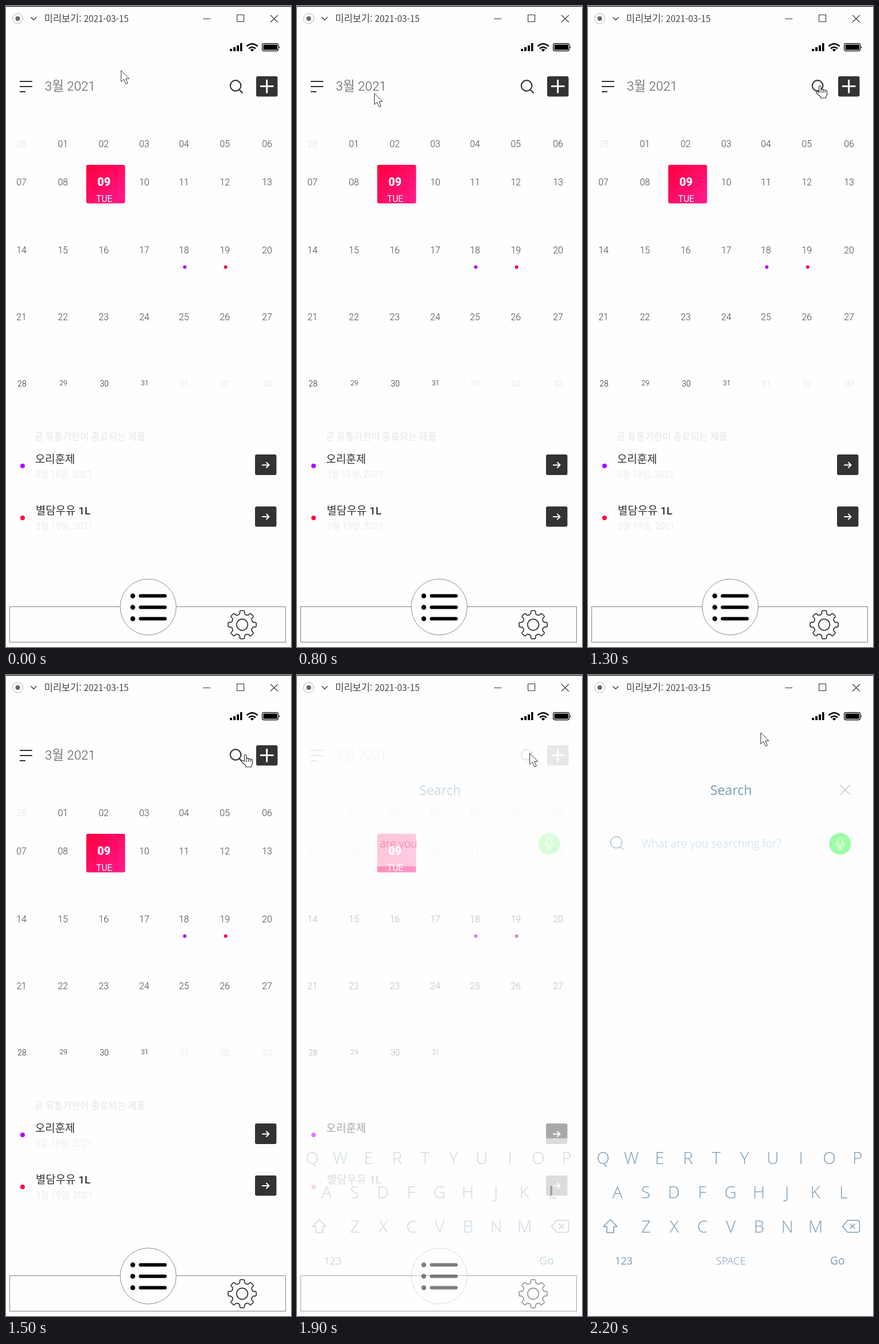
An HTML page that plays this animation: 499x1122 px, repeating every 2.3 s.

```html
<!DOCTYPE html>
<html lang="ko">
<head>
<meta charset="utf-8">
<title>Calendar preview</title>
<style>
  html, body { margin: 0; width: 100%; height: 100%; overflow: hidden; background: #fefefe; }
  svg { display: block; width: 100%; height: 100%; }
  text { font-family: Roboto, "Noto Sans CJK KR", "Noto Sans CJK", sans-serif; fill: #444; }
  .ko { font-family: "Noto Sans CJK KR", "Noto Sans CJK", sans-serif; }
  .mid { text-anchor: middle; }
  .line { fill: none; stroke: #333; }
  .thin { font-weight: 300; }
  .pale { font-weight: 300; fill: #e4e4e4; }
  .pale tspan { fill: #ececec; }
  .item { font-size: 19px; font-weight: 500; fill: #333; }
  .white { fill: none; stroke: #fff; stroke-width: 2; }
  .ui text { font-family: "Open Sans", "Noto Sans", sans-serif; fill: #7d9cb5; }
  .ui .line { stroke: #7d9cb5; }
</style>
</head>
<body>
<svg viewBox="0 0 499 1122" preserveAspectRatio="none">
  <defs>
    <linearGradient id="pink" gradientUnits="userSpaceOnUse" x1="141" y1="278" x2="208" y2="345">
      <stop offset=".1" stop-color="#ff0045"/><stop offset="1" stop-color="#ff1c8c"/>
    </linearGradient>
    <clipPath id="day"><rect x="140" y="278" width="69" height="67"/></clipPath>
  </defs>

  <!-- window bar and status icons -->
  <path d="M0 .5H499" stroke="#222" stroke-width="1.4"/>
  <circle cx="20.5" cy="22" r="9" fill="none" stroke="#b5b5b5"/>
  <circle cx="20.5" cy="22" r="4" fill="#666"/>
  <path class="line" d="M43.500 19.500l5 5 5-5" stroke-width="1.3"/>
  <text class="ko" x="67" y="27.500" font-size="15.300"><tspan font-size="16.500">미리보기</tspan>: 2021-03-15</text>
  <path class="line" d="M345 22.500H358M404.500 15.500h12v12h-12zM463 16l13 12.500M476 16l-13 12.500" stroke-width="1.1"/>
  <path d="M392 75h4v4h-4zM398 72h4v7h-4zM404 69h4v10h-4zM410 65h3.500v14H410z" fill="#000"/>
  <path d="M421.500 70.500q9.500-8.500 19 0M425 74.500q6-5 12 0" fill="none" stroke="#000" stroke-width="2.6"/>
  <path d="M427.500 76.500q3.500-2.500 7 0l-3.500 3.200z" fill="#000"/>
  <rect x="448.600" y="65.600" width="28" height="13" rx="3" fill="none" stroke="#000" stroke-width="1.2"/>
  <rect x="450.500" y="67.500" width="24.500" height="9.300" rx="1.500" fill="#000"/>
  <path d="M478 70q2.500 2 0 4.500z" fill="#000"/>

  <!-- search page -->
  <g class="ui" data-fade="search">
    <text x="214" y="209.500" font-size="23.200">Search</text>
    <circle cx="441.500" cy="295.500" r="19" fill="#9cfda4"/>
    <path class="white" d="M441.500 285a3.500 3.500 0 0 1 3.500 3.500v6a3.500 3.500 0 0 1-7 0v-6a3.500 3.500 0 0 1 3.500-3.500zM434.500 292.500v2a7 7 0 0 0 14 0v-2M441.500 301.500v4M437 305.500h9" style="stroke-width:1.400"/>
    <g id="keys"></g>
    <path class="line" d="M39 953l12 12.500h-6v10.500H33v-10.500h-6z" stroke-width="1.600" stroke-linejoin="round"/>
    <path class="line" d="M445.500 965l9-10.500H472q3.500 0 3.500 3.500v14q0 3.500-3.500 3.500h-17.500zM458.500 960.500l9 9M467.500 960.500l-9 9" stroke-width="1.500"/>
    <text x="47" y="1032" font-size="18.200">123</text>
    <text x="424" y="1032" font-size="19.200">Go</text>
  </g>
  <g class="ui" data-fade="field">
    <path class="line" d="M441.500 192.500l17.500 17M459 192.500l-17.500 17" stroke-width=".9"/>
    <circle class="line" cx="49.500" cy="293" r="10"/>
    <path class="line" d="M56.500 300.500l5.500 5.500"/>
    <text class="thin" x="94" y="301.500" font-size="19.600" style="fill:#bfdaec">What are you searching for?</text>
    <text class="mid thin" x="250" y="1032" font-size="18.400">SPACE</text>
  </g>

  <!-- calendar page -->
  <g data-fade="top">
    <path class="line" d="M24 132H46M24 141H46M24 150H34" stroke-width="2.200"/>
    <circle class="line" cx="402" cy="139.500" r="9.300" stroke-width="2.200"/>
    <path class="line" d="M408.500 146.500l6 6" stroke-width="2.300"/>
  </g>
  <g data-fade="head"><text class="thin" x="68" y="148" font-size="22.500" style="fill:#555">3<tspan fill="#777">월</tspan> 2021</text></g>
  <g data-fade="top">
    <rect x="438" y="123" width="37.500" height="35.500" rx="3" fill="#333"/>
    <path class="white" d="M445 140.500h23.500M456.700 129v23.500" style="stroke-width:3"/>
  </g>
  <g data-fade="box"><path d="M140.500 335v-54q0-3 3-3h62q3 0 3 3v54z" fill="url(#pink)"/></g>
  <g data-fade="boxEdge"><path d="M140.500 335h68v7.500q0 3-3 3h-62q-3 0-3-3z" fill="url(#pink)"/></g>
  <g data-fade="ghost" clip-path="url(#day)">
    <text x="94" y="301.500" font-size="19.600" style="font-family:'Open Sans',sans-serif;font-weight:300;fill:#d82068">What are you searching for?</text>
  </g>
  <g data-fade="label">
    <text class="mid" x="171.500" y="315" font-size="20" font-weight="800" style="fill:#fff">09</text>
    <text class="mid" x="172" y="343" font-size="15.600" style="fill:#fff">TUE</text>
  </g>
  <g id="days"></g>
  <g data-fade="dots">
    <circle cx="313" cy="457" r="3" fill="#b400ff"/><circle cx="384.500" cy="457" r="3" fill="#ff0040"/>
    <circle cx="29" cy="805" r="4" fill="#b400ff"/>
  </g>
  <g data-fade="faint">
    <text class="pale" x="50" y="759.500" font-size="16.500">곧 유통기한이 종료되는 제품</text>
    <text class="pale" x="51" y="824.500" font-size="15.600">3<tspan>월</tspan> 18<tspan>일</tspan>, 2021</text>
    <text class="pale" x="52" y="915.500" font-size="15.600">3<tspan>월</tspan> 19<tspan>일</tspan>, 2021</text>
  </g>
  <g data-fade="item1">
    <text class="item" x="51" y="800">오리훈제</text>
    <path d="M436 811v-23q0-3 3-3h31.500q3 0 3 3v23z" fill="#333"/>
  </g>
  <g data-fade="item2">
    <path d="M436 811h37.500v7q0 3-3 3H439q-3 0-3-3z" fill="#333"/>
    <text class="item" x="52" y="890">별담우유 1L</text>
    <circle cx="29" cy="896" r="4" fill="#ff0040"/>
    <rect x="436" y="876" width="37.500" height="35.500" rx="3" fill="#333"/>
  </g>
  <g data-fade="label">
    <path class="white" d="M448 803.500h12.500M455.500 798.500l5 5-5 5M448 894h12.500M455.500 889l5 5-5 5"/>
  </g>
  <g data-fade="ghost"><path d="M445.500 894v17" stroke="#5c6b78" stroke-width="3"/></g>

  <!-- bottom bar -->
  <g data-fade="bar"><rect x="6.500" y="1051.500" width="483" height="62" fill="none" stroke="#808080"/></g>
  <g data-fade="disc"><circle cx="249" cy="1052" r="49" fill="#fefefe" stroke="#808080" stroke-width=".9"/></g>
  <g data-fade="nav">
    <path d="M235.500 1032.500h43M235.500 1052.500h43M235.500 1072.500h43" stroke="#000" stroke-width="6" stroke-linecap="round"/>
    <path d="M222 1032.500h0M222 1052.500h0M222 1072.500h0" stroke="#000" stroke-width="8.500" stroke-linecap="round"/>
    <path id="gear" class="line" stroke-width="1.700" stroke-linejoin="round"/>
    <circle class="line" cx="413.500" cy="1083" r="9.800" stroke-width="1.700"/>
  </g>

  <g id="arrow"><path d="M.5 1v19.500l4.700-4.200 3.700 8.400 3.200-1.400-3.500-8.100h6z" fill="#fff" stroke="#333" stroke-linejoin="round"/></g>
  <g id="hand"><path d="M6.500 13.500V3.500q0-2 1.700-2t1.800 2v5.700q.4-1.700 2-1.500 1.600.2 1.700 1.800.4-1.300 1.900-1 1.500.3 1.600 1.800.5-1 1.800-.7 1.500.4 1.500 2.200v4.700q0 2.500-2 4.300v2.200H9v-2.200L2 14.500q-1.400-2 .2-2.800 1.400-.6 2.600.6zM10 9v5M13.700 10v4M17.200 11v3" fill="#fff" stroke="#333" stroke-width="1.200" stroke-linejoin="round"/></g>
</svg>
<script>
const $ = id => document.getElementById(id);
const STEP = 100, LOOP = 2300, FADE = 18;

const label = (str, x, y, size, extra = '') =>
  `<text class="mid thin" x="${x}" y="${y}" font-size="${size}" ${extra}>${str}</text>`;
const pad = n => String(n).padStart(2, '0');

// calendar days
const cols = [27, 99.5, 171, 242, 311.5, 383, 457];
const rows = [246.7, 313.5, 432.5, 550.2, 666];
$('days').innerHTML = rows.map((y, r) => {
  const cells = cols.map((x, c) => {
    const n = r * 7 + c;
    if (n === 9) return '';
    const out = n === 0 || n > 31;
    const small = n === 29 || n === 31;
    const size = r < 4 ? 16 : small ? 12 : 14;
    const day = n === 0 ? 28 : n > 31 ? n - 31 : n;
    const fill = out ? 'style="fill:#e0e0e0" data-fade="faint"' : r === 4 ? 'style="fill:#222"' : '';
    return label(pad(day), r < 4 ? x : x + 1, small ? y - 2 : y, size, fill);
  });
  return `<g data-fade="${r < 2 ? 'early' : 'late'}">${cells.join('')}</g>`;
}).join('');

// keyboard letters
$('keys').innerHTML = [['QWERTYUIOP', 26.5], ['ASDFGHJKL', 51.5], ['ZXCVBNM', 101.5]]
  .map(([keys, x0], r) => [...keys].map((k, i) => label(k, x0 + i * 49.5, 856 + r * 60, 29.5)).join(''))
  .join('');

// gear with eight teeth
const polar = (deg, r) => {
  const a = deg * Math.PI / 180;
  return `${(413.5 + r * Math.sin(a)).toFixed(1)} ${(1083 - r * Math.cos(a)).toFixed(1)}`;
};
let gear = '';
for (let a = 0; a < 360; a += 45) {
  gear += `${a ? 'L' : 'M'}${polar(a - 12, 20)}L${polar(a - 10, 23.5)}Q${polar(a - 9, 24.7)} ${polar(a - 6, 24.7)}` +
    `L${polar(a + 6, 24.7)}Q${polar(a + 9, 24.7)} ${polar(a + 10, 23.5)}L${polar(a + 12, 20)}Q${polar(a + 22.5, 17)} ${polar(a + 33, 20)}`;
}
$('gear').setAttribute('d', gear + 'Z');

// opacity per step from the start of the page change
const fades = {
  top: [.62, .11], head: [.55, .06], early: [.62, .05], late: [.72, .36, .08],
  box: [.74, .22], boxEdge: [.86, .46, .1], label: [1, 1], dots: [.9, .5, .08],
  faint: [.45], item1: [.82, .42, .08], item2: [.63, .16],
  bar: [.95, .7, .15], disc: [.85, .3, .1], nav: [.82, .5, .12],
  ghost: [.3, .5], search: [0, .38, .75, .95, 1], field: [0, 0, .7, .95, 1]
};
const incoming = { search: 1, field: 1, ghost: 1 };
const faders = [...document.querySelectorAll('[data-fade]')];

// pointer position at each step
const path = [
  [201, 112], [166, 110], [122, 112], [78, 117], [42, 123], [33, 130], [31, 134],
  [62, 145], [135, 152], [228, 152], [315, 146], [374, 138], [388, 138],
  [398, 138], [407, 138], [411, 138], [411, 138], [411, 138],
  [407, 136], [407, 136], [388, 124], [345, 108], [302, 100]
];

function draw(now) {
  const i = Math.floor(now % LOOP / STEP);
  for (const el of faders) {
    const key = el.dataset.fade;
    el.style.opacity = i < FADE ? (incoming[key] ? 0 : 1) : fades[key][i - FADE] ?? 0;
  }
  const onLink = i > 12 && i < FADE;
  $('arrow').style.display = onLink ? 'none' : '';
  $('hand').style.display = onLink ? '' : 'none';
  $(onLink ? 'hand' : 'arrow').setAttribute('transform', `translate(${path[i]})`);
}

const start = performance.now();
function tick() {
  draw(performance.now() - start);
  requestAnimationFrame(tick);
}
tick();
</script>
</body>
</html>
```
